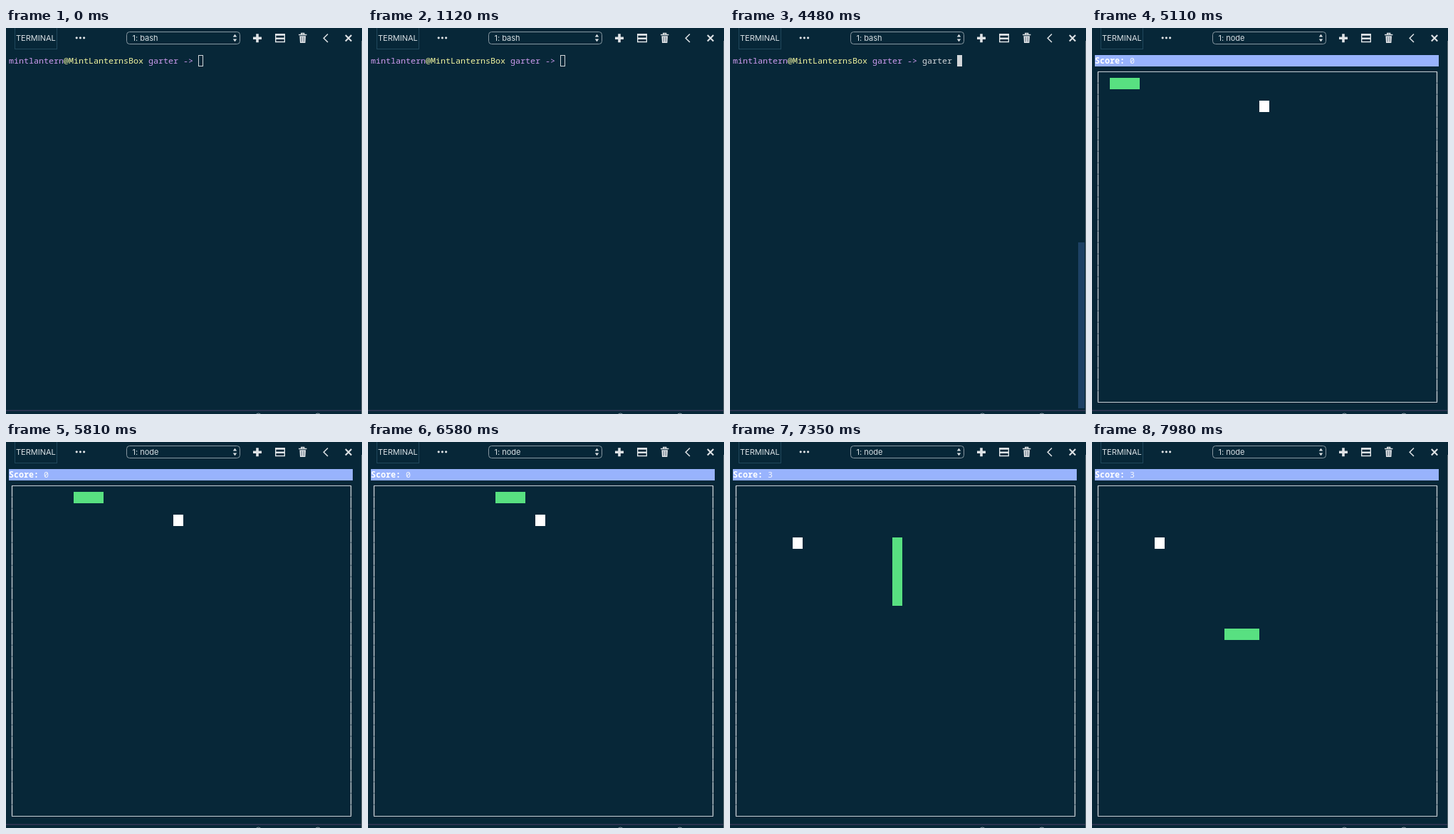
These frames come from a looping animation (500 px wide and 542 px high, 8 s). An HTML page:

```html
<!DOCTYPE html>
<html lang="en">
<head>
<meta charset="utf-8">
<title>Terminal snake</title>
<style>
  html, body { margin: 0; width: 100%; height: 100%; overflow: hidden; background: #072738; }
  svg { display: block; width: 100vw; height: 100vh; }
  text { white-space: pre; }
  .ui { font-family: Inter, "Liberation Sans", sans-serif; fill: #d9e0e4; }
  .mono { font-family: "Noto Sans Mono", "Liberation Mono", monospace; font-size: 11.667px; }
  .icon { fill: none; stroke: #dfe3e6; }
</style>
</head>
<body>
<svg viewBox="0 0 500 542">
  <rect width="500" height="542" fill="#072738"/>

  <!-- window edges -->
  <path d="M499.5 18V542" stroke="#5b6972"/>
  <path d="M0 537.2H499" stroke="#3f3a5c" stroke-width="1.2"/>
  <g fill="none" stroke="#8797a1">
    <circle cx="354.5" cy="545" r="4"/>
    <circle cx="438" cy="545" r="4"/>
  </g>

  <!-- panel header -->
  <rect x="12.5" y="-1" width="59" height="30.5" fill="none" stroke="#20485c"/>
  <text class="ui" x="14" y="18" font-size="11">TERMINAL</text>
  <g fill="#dfe3e6">
    <circle cx="99.2" cy="13.8" r="1.6"/>
    <circle cx="104.4" cy="13.8" r="1.6"/>
    <circle cx="109.6" cy="13.8" r="1.6"/>
    <path d="M318.8 12.4L321.5 8.8L324.2 12.4ZM318.8 15.6L321.5 19.2L324.2 15.6Z"/>
  </g>
  <rect x="169.5" y="5.5" width="159" height="17" rx="4" fill="none" stroke="#8998a2"/>
  <text id="shell" class="ui" x="177.5" y="18" font-size="11"></text>
  <g class="icon">
    <path d="M347 14.2H359M353 8.2V20.2" stroke-width="3.6"/>
    <path d="M378.7 9V19.5H391.3V9" stroke-width="1.4"/>
    <path d="M378 9.4H392M378 14.8H392" stroke-width="2.6"/>
    <path d="M411 9.6H422.4M414.8 9V7.6H418.6V9" stroke-width="1.5"/>
    <path d="M412.4 11.2H421L420.4 21H413Z" fill="#dfe3e6" stroke="none"/>
    <path d="M415.2 12.5V19.5M418.2 12.5V19.5" stroke="#45596a" stroke-width="0.9"/>
    <path d="M452 8.5L446.2 14.2L452 20" stroke-width="1.5"/>
    <path d="M476.8 10L485.2 18.4M485.2 10L476.8 18.4" stroke-width="2.1"/>
  </g>

  <g id="prompt" class="mono">
    <text id="user" y="50" fill="#cf9cf0"></text>
    <text id="host" y="50" fill="#f5f7a0"></text>
    <text id="path" y="50" fill="#cf9cf0"></text>
    <text id="typed" y="50" fill="#d3d7da"></text>
    <rect id="cursor" stroke="#d3d7da"/>
    <rect id="bar" x="489" y="301" width="9" height="233" fill="#1d4164"/>
  </g>

  <g id="game">
    <rect x="4" y="38" width="483" height="16" fill="#98b3fd"/>
    <text class="mono" x="4" y="50" fill="#fff" font-weight="700">Score:</text>
    <text id="score" class="mono" x="53" y="50" fill="#f4f6fa"></text>
    <path d="M8.5 61.5H484.5V525.5H8.5Z" fill="none" stroke="#8d9aa4" stroke-width="1.2"/>
    <path d="M8 61.5H485M8 525.5H485" stroke="#c9cfd5" stroke-width="1.2"/>
    <path d="M8.5 62V525M484.5 62V525" stroke="#c9cfd5" stroke-width="1.2" stroke-dasharray="14.5 1.5"/>
    <rect id="food" width="14" height="16" fill="#fff"/>
    <path id="snake" fill="#58e081"/>
  </g>
</svg>
<script>
const LOOP = 8000, TICK = 70;
const CELL_W = 7, CELL_H = 16;
const $ = id => document.getElementById(id);
const colX = col => 4 + CELL_W * col;
const rowY = row => 38 + CELL_H * row;

function set(id, attrs) {
  for (const key in attrs) $(id).setAttribute(key, attrs[key]);
}

// prompt runs, laid out on the character grid
let col = 0;
for (const [id, str] of [["user", "mintlantern"], ["host", "@MintLanternsBox "], ["path", "garter -> "], ["typed", ""]]) {
  $(id).textContent = str;
  set(id, { x: colX(col) });
  col += str.length;
}
const inputCol = col;

const COMMAND = "garter ";
const KEYS = [2380, 2520, 2730, 2940, 3080, 3220, 3430];
const BAR_SHOW = 1680, FOCUS = 1960, ENTER = 4620, RENAME = 4760, GAME = 4970;

const STEP = 66;
const START = 5110 - 0.3 * STEP;   // head is on column 7
const TURN_DOWN = 25, EAT = 27, TURN_LEFT = 37;

// head cell after n steps: right, down, then left
function cellAt(n) {
  const right = Math.min(n, TURN_DOWN);
  const down = Math.min(Math.max(n - TURN_DOWN, 0), TURN_LEFT - TURN_DOWN);
  const left = Math.max(n - TURN_LEFT, 0);
  return [7 + right - left, 2 + down];
}

function drawPrompt(t) {
  const count = KEYS.filter(k => t >= k).length;
  $("typed").textContent = COMMAND.slice(0, count);
  const focused = t >= FOCUS, entered = t >= ENTER;
  const x = entered ? colX(0) : colX(inputCol + count);
  const y = rowY(entered ? 1 : 0);
  set("cursor", {
    x: x + 0.5, y: y + 0.5, width: 6, height: 15,
    fill: focused ? "#d3d7da" : "none"
  });
  set("bar", { opacity: Math.min(Math.max((t - BAR_SHOW) / 140, 0), 1) });
}

function drawGame(t) {
  const n = Math.floor((t - START) / STEP);
  const length = n >= EAT ? 6 : 5;
  let d = "";
  for (let i = 0; i < length; i++) {
    const [c, r] = cellAt(n - i);
    d += `M${colX(c)} ${rowY(r)}h14v16h-14Z`;
  }
  set("snake", { d });
  const [fc, fr] = n > EAT ? [12, 6] : [33, 4];
  set("food", { x: colX(fc), y: rowY(fr) });
  $("score").textContent = n >= EAT ? "3" : "0";
}

function render(ms) {
  const t = Math.floor((ms % LOOP) / TICK) * TICK;
  const playing = t >= GAME;
  $("shell").textContent = t >= RENAME ? "1: node" : "1: bash";
  set("prompt", { display: playing ? "none" : "inline" });
  set("game", { display: playing ? "inline" : "none" });
  if (playing) drawGame(t); else drawPrompt(t);
}

const begin = performance.now();
function frame() {
  render(performance.now() - begin);
  requestAnimationFrame(frame);
}
frame();
</script>
</body>
</html>
```
